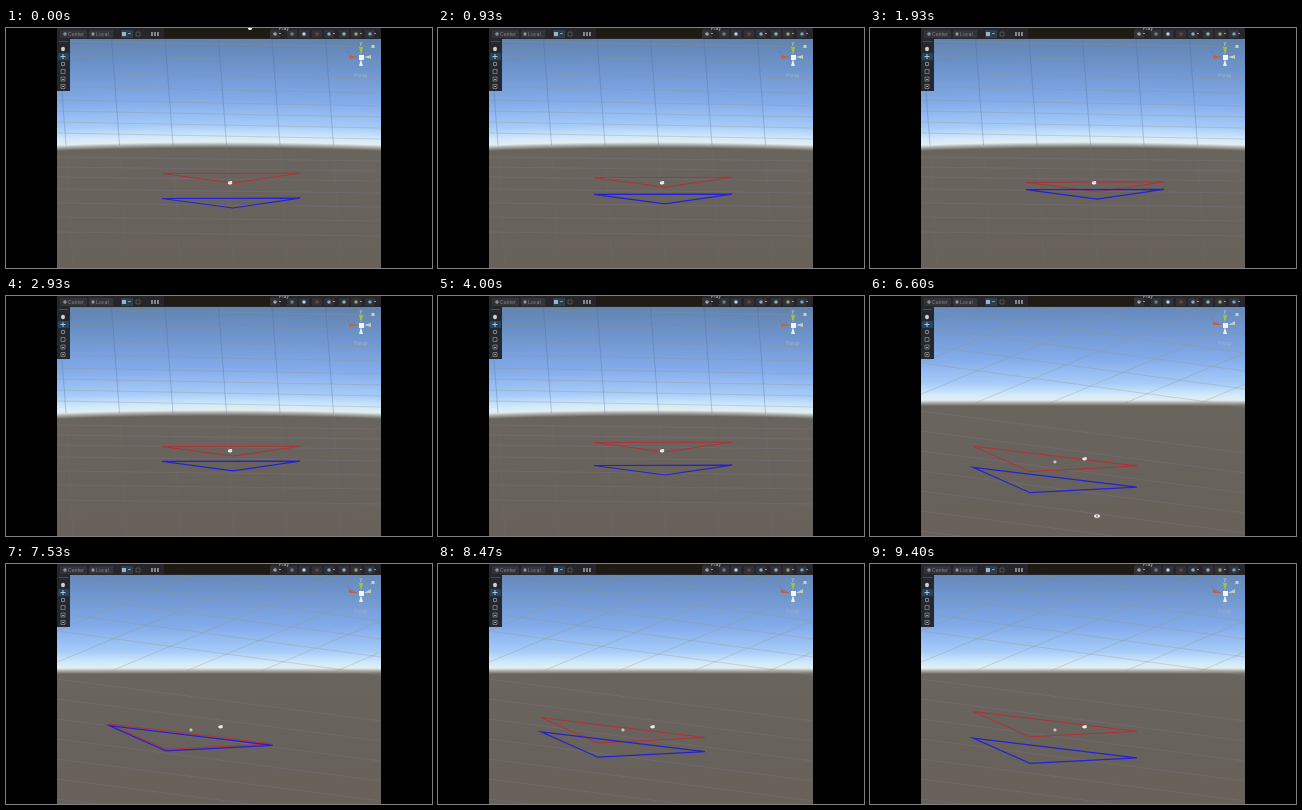
Recreate the animation shown at these times as an HTML page with a canvas. Size 426 by 240 pixels, loop 9470 ms.

```html
<!DOCTYPE html>
<html>
<head>
<meta charset="utf-8">
<style>
html, body { margin: 0; height: 100%; overflow: hidden; background: #000; }
canvas { display: block; width: 426px; height: 240px; }
</style>
</head>
<body>
<canvas id="stage" width="426" height="240"></canvas>
<script>
const g = document.getElementById('stage').getContext('2d');
const LOOP = 9470, LEFT = 51, RIGHT = 375, WIDTH = RIGHT - LEFT;

// Camera poses: triangle corners relative to the midpoint between both triangles.
const views = [
  { mid: 158, tri: [156, 0, 294, -.3, 227, 9.5], horizon: 117, bow: 3, icons: [224, 155, 224, 155], gridX: 52, step: 53.5 },
  { mid: 165, tri: [139, 0, 320, -.3, 234, 12.5], horizon: 117, bow: 3, icons: [228, 161, 227, 161], gridX: 74, step: 64 },
  { mid: 160.8, tri: [103, 0, 267, 19.8, 160, 25.3], horizon: 107, bow: .2, icons: [214.5, 163, 185, 166], gridX: 95, step: 75 }
];
const cameraKeys = [[0, 0], [4080, 0], [5060, 1], [5180, 1], [6480, 2], [LOOP, 2]];
const spreadKeys = [[0, 12.5], [1930, 3.7], [4000, 11.5], [5130, 16.5], [6600, 10.6], [7530, .8], [9400, 13.3], [LOOP, 13.3]];

const mix = (a, b, k) => Array.isArray(a) ? a.map((v, i) => mix(v, b[i], k)) : a + (b - a) * k;

function ease(keys, t) {
  const i = Math.max(1, keys.findIndex(key => key[0] >= t));
  const [t0, a] = keys[i - 1], [t1, b] = keys[i];
  return mix(a, b, (1 - Math.cos(Math.PI * (t - t0) / (t1 - t0))) / 2);
}

function cameraAt(t) {
  const c = ease(cameraKeys, t), i = Math.min(1, Math.floor(c)), view = { turn: Math.max(0, c - 1) };
  for (const name in views[0]) view[name] = mix(views[i][name], views[i + 1][name], c - i);
  return view;
}

function box(x, y, w, h, color) {
  g.fillStyle = color;
  g.fillRect(x, y, w, h);
}

function poly(points, color, width) {
  g.beginPath();
  for (let i = 0; i < points.length; i += 2) g.lineTo(points[i], points[i + 1]);
  g.closePath();
  if (width) {
    g.strokeStyle = color;
    g.lineWidth = width;
    g.stroke();
  } else {
    g.fillStyle = color;
    g.fill();
  }
}

function oval(x, y, rx, ry, color) {
  g.beginPath();
  g.ellipse(x, y, rx, ry, 0, 0, 7);
  g.fillStyle = color;
  g.fill();
}

function label(text, x, y, size, color) {
  g.font = size + 'px Inter, sans-serif';
  g.fillStyle = color;
  g.fillText(text, x, y);
}

// A huge circle gives the ground its slightly curved edge.
function drawWorld({ horizon, bow }) {
  const r = 162 * 162 / (2 * bow), span = 130, cy = horizon + r;
  const fill = g.createRadialGradient(213, cy, r - span, 213, cy, r + span);
  const stops = [[-130, '#67615a'], [-3, '#69645e'], [0, '#a3a5a2'], [3, '#e4eeee'], [8, '#d3eafc'],
    [20, '#a6cbf8'], [45, '#83abea'], [80, '#6d93cb'], [105, '#6284b0'], [130, '#5d7ca4']];
  for (const [d, color] of stops) fill.addColorStop((d + span) / (2 * span), color);
  box(LEFT, 0, WIDTH, 240, fill);
}

function drawGrid({ gridX, step, horizon, turn }) {
  const line = (x0, y0, x1, y1, color) => poly([x0, y0, x1, y1], color, .6);
  const warm = 'rgba(145,150,130,.3)', cool = 'rgba(145,130,160,.2)', dark = 'rgba(75,105,145,.28)';
  g.globalAlpha = 1 - turn;
  for (let i = 0; i < 7; i++) {
    const x = gridX + (i - 1) * step;
    line(x, 11, x + 8, horizon, dark);
    line(x + 8, horizon, x + 15, 240, 'rgba(145,130,160,.08)');
  }
  for (const d of [9, 20, 31, 42, 55, 69, 86, 101]) line(LEFT, horizon - d - 3, RIGHT, horizon - d + 3, warm);
  for (const d of [14, 24, 34, 46, 60, 74, 89]) line(LEFT, horizon + d - 2, RIGHT, horizon + d + 2, cool);
  g.globalAlpha = turn;
  for (let i = 0; i < 6; i++) {
    const y = horizon - 8 - 18 * i;
    line(LEFT, y - 32, RIGHT, y + 12, warm);
    const x = gridX + (i - 1) * step;
    line(x - 65, horizon, x + 165, 11, warm);
  }
  for (let i = 0; i < 7; i++) {
    const y = horizon + 8 + 20 * i;
    line(LEFT, y, RIGHT, y + 42, cool);
  }
  g.globalAlpha = 1;
}

function drawTriangles({ tri, mid, icons }, spread) {
  const shifted = dy => tri.map((v, i) => i % 2 ? v + mid + dy : v);
  poly(shifted(-spread), '#b82c34', .9);
  poly(shifted(spread), '#2222d4', 1.2);
  const [x, y, lightX, lightY] = icons;
  oval(lightX, lightY, 1.6, 1.4, '#c8c8c4');
  oval(x, y, 2.3, 1.4, '#f2eeea');
  box(x, y - 2, 2, 2, '#e0dcd8');
}

function drawGizmo(turn) {
  const tilt = -2 * turn;
  poly([343, 27 + tilt, 343, 31 + tilt, 352, 29], '#c8603c');
  poly([365, 27 + tilt, 365, 31 + tilt, 358, 29], '#c5cbbd');
  poly([353, 19, 357, 19, 355, 27], '#9dc834');
  poly([353, 38, 357, 38, 355, 31], '#eceeee');
  box(353, 27, 5, 5, '#f4f4f0');
  label('y', 353.5, 17, 5, '#d5dca0');
  label('x', 341, 26 + tilt, 4, '#c8604a');
  label('Persp', 348, 48.5, 5, '#9fb5d5');
  box(365.5, 17, 3, 3, '#c8cdd2');
}

function drawBars() {
  box(LEFT, 0, WIDTH, 11, '#25252a');
  box(158, 0, 107, 10, '#1e1a14');
  box(54, 2, 27, 8, '#33343a');
  box(83, 2, 24, 8, '#33343a');
  oval(59, 6, 1.7, 1.7, '#8e9298');
  label('Center', 62, 8, 5, '#888b90');
  oval(87, 6, 1.7, 1.7, '#8e9298');
  label('Local', 90, 8, 5, '#888b90');
  box(115, 2, 12, 8, '#2c3f50');
  box(116, 4, 4, 4, '#9bb5c8');
  box(122, 5, 3, 1, '#8d979b');
  poly([130, 8, 130, 4, 134, 4, 134, 8], '#606060', .8);
  for (const x of [145, 148, 151]) box(x, 4, 2, 4, '#85858a');
  [269, 286, 298, 311, 323, 338, 350, 364].forEach((x, i) => {
    box(x - 5, 2, 10, 8, '#303238');
    oval(x, 6, 1.8, 1.8, ['#a0a09a', '#74787c', '#b0d0e4', '#6e4040', '#80a8c4', '#92acba', '#a89a60', '#6ca0c4'][i]);
  });
  for (const x of [273, 327, 354, 368]) box(x, 5, 2, 1, '#999');
  label('Play', 273, 2, 5, '#c0c0c0');

  box(LEFT, 11, 13, 52, '#24282e');
  box(53, 13, 9, 1, '#4a4e55');
  box(52, 25, 11, 7, '#264460');
  oval(57, 21, 2, 2.3, '#d0d0d0');
  box(56.5, 26, 1, 5, '#a5c5dc');
  box(54.5, 28, 5, 1, '#a5c5dc');
  oval(57, 36, 2.2, 2.2, '#8c9094');
  oval(57, 36, 1.3, 1.3, '#24282e');
  for (const y of [41.5, 49, 56.5]) poly([55, y, 59, y, 59, y + 4, 55, y + 4], '#888c90', .8);
  box(56, 51, 2, 1, '#a0a0a0');
  box(56, 58, 2, 1, '#a0a0a0');
}

function drawCursor(t) {
  if (t < 200) oval(244, .5, 2, 1.5, '#fff');
  if (t > 4900 && t < 5300) poly([282, 211, 282, 217, 283.5, 215.5, 286, 215], '#f0f2f8');
  if (t >= 5300 && t < 6750) {
    const k = Math.min(1, (t - 5300) / 1100);
    const x = mix(283, 227, k), y = mix(214, 220, k);
    oval(x, y, 3, 1.8, '#f0f0f0');
    oval(x, y, 1, .8, '#555');
  }
}

function draw(now) {
  const t = now % LOOP, view = cameraAt(t);
  box(0, 0, 426, 240, '#000');
  g.save();
  g.beginPath();
  g.rect(LEFT, 0, WIDTH, 240);
  g.clip();
  drawWorld(view);
  drawGrid(view);
  drawTriangles(view, ease(spreadKeys, t));
  drawGizmo(view.turn);
  drawBars();
  drawCursor(t);
  g.restore();
  requestAnimationFrame(draw);
}
requestAnimationFrame(draw);
</script>
</body>
</html>
```
